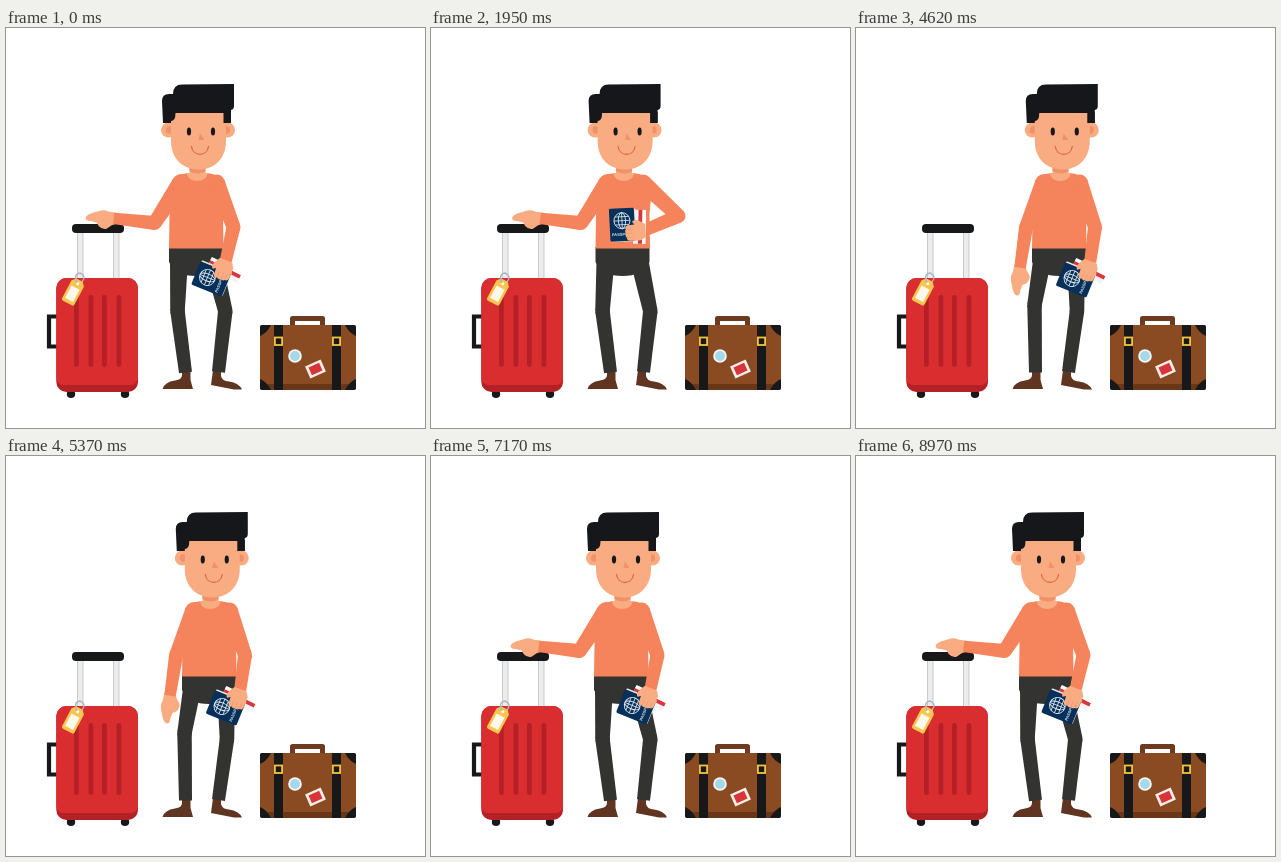
Recreate the animation shown at these times as an HTML page with a canvas. Size 419 by 400 pixels, loop 9000 ms.

```html
<!DOCTYPE html>
<html lang="en">
<head>
<meta charset="utf-8">
<title>Traveller</title>
<style>
html, body { margin: 0; width: 100%; height: 100%; overflow: hidden; background: #fff; }
canvas { display: block; width: 419px; height: 400px; }
</style>
</head>
<body>
<canvas id="stage"></canvas>
<script>
const W = 419, H = 400, LOOP = 9000;
const canvas = document.getElementById('stage');
const ctx = canvas.getContext('2d');
const dpr = window.devicePixelRatio || 1;
canvas.width = W * dpr;
canvas.height = H * dpr;

const SKIN = '#f9ab82', SHADE = '#ef9169', SHIRT = '#f5835b', PANTS = '#333331';
const HAIR = '#15171a', SHOE = '#5f3420', NAVY = '#06305a', BLACK = '#17181a';
const RAD = Math.PI / 180;

// Motion tracks: [time, value]
const BODY = [[0, 0], [500, 0], [1950, 1.5], [3720, 2.2], [4480, 13], [5500, 13], [6520, 12.3], [7120, 0], [9000, 0]];
const RELEASE = [[0, 0], [3740, 0], [4440, 1], [6520, 1], [7120, 0], [9000, 0]];
const RAISE = [[0, 0], [350, 0], [930, 1], [3740, 1], [4440, 0], [9000, 0]];
const SWING = [[0, 0], [350, 0], [1350, 8], [1950, 0], [2800, 11], [3390, 0], [3740, 0], [4620, -1.5],
  [5500, -1.5], [6120, 3], [7170, -1], [8150, 12], [8970, 0], [9000, 0]];

function track(keys, t) {
  let i = 1;
  while (i < keys.length - 1 && t > keys[i][0]) i++;
  const [t0, a] = keys[i - 1], [t1, b] = keys[i];
  const k = Math.min(1, Math.max(0, (t - t0) / (t1 - t0)));
  return a + (b - a) * k * k * (3 - 2 * k);
}
const mix = (a, b, k) => a + (b - a) * k;
const mixPt = (a, b, k) => [mix(a[0], b[0], k), mix(a[1], b[1], k)];
const polar = (p, deg, len) => [p[0] + Math.cos(deg * RAD) * len, p[1] + Math.sin(deg * RAD) * len];

function fill(path, color) {
  ctx.fillStyle = color;
  ctx.fill(path instanceof Path2D ? path : new Path2D(path));
}
function line(path, color, width) {
  ctx.strokeStyle = color;
  ctx.lineWidth = width;
  ctx.stroke(new Path2D(path));
}
function box(x, y, w, h, color, r = 0) {
  const p = new Path2D();
  p.roundRect(x, y, w, h, r);
  fill(p, color);
}
function oval(x, y, rx, ry, color) {
  const p = new Path2D();
  p.ellipse(x, y, rx, ry, 0, 0, 7);
  fill(p, color);
}
function at(x, y, deg, draw) {
  ctx.save();
  ctx.translate(x, y);
  ctx.rotate(deg * RAD);
  draw();
  ctx.restore();
}
// Tapered limb segment, rounded at its start
function limb(a, b, wa, wb, color) {
  const ang = Math.atan2(b[1] - a[1], b[0] - a[0]);
  const nx = -Math.sin(ang) / 2, ny = Math.cos(ang) / 2;
  const p = new Path2D();
  p.moveTo(a[0] + nx * wa, a[1] + ny * wa);
  p.lineTo(b[0] + nx * wb, b[1] + ny * wb);
  p.lineTo(b[0] - nx * wb, b[1] - ny * wb);
  p.lineTo(a[0] - nx * wa, a[1] - ny * wa);
  p.closePath();
  fill(p, color);
  oval(a[0], a[1], wa / 2, wa / 2, color);
}

function redCase() {
  for (const x of [71, 107]) {
    box(x, 203, 6.5, 48, '#c9cacb');
    box(x + 1, 203, 4.5, 48, '#ececec');
  }
  box(66, 196, 52, 9, BLACK, 4);
  line('M51 288.500H43V318.500H51', BLACK, 4.2);
  for (const x of [65, 119]) oval(x, 366, 4.2, 4, BLACK);
  box(50.3, 250, 81.7, 114, '#b32026', 10);
  box(50.3, 250, 81.7, 107, '#d92d30', [10, 10, 7, 7]);
  for (const x of [68, 82.5, 96, 110.5]) box(x, 267, 4.8, 72, '#b52026', 2.4);
  at(67.5, 263.5, 28, () => {
    fill('M-7 -9L-3.500 -13H3.500L7 -9V11Q7 13 5 13H-5Q-7 13 -7 11Z', '#f7c650');
    box(-4.5, -4.5, 9, 14, '#fdf8ec');
    oval(0, -9, 1.6, 1.6, '#fff');
  });
  line('M71 255Q67 246 74 245Q81 248 76 254', '#a9b8c2', 1.4);
}

function brownCase() {
  ctx.lineJoin = 'round';
  line('M286.500 298V290.500H316.500V298', '#6f3b20', 5);
  ctx.lineJoin = 'miter';
  box(254, 297, 96, 65, '#6a3618', 3);
  box(254, 297, 96, 59, '#8b4b22', [3, 3, 0, 0]);
  for (const [x, y, sx, sy] of [[254, 297, 1, 1], [350, 297, -1, 1], [254, 362, 1, -1], [350, 362, -1, -1]]) {
    ctx.save();
    ctx.translate(x, y);
    ctx.scale(sx, sy);
    fill('M0 2Q0 0 2 0H11Q7 8 0 11Z', BLACK);
    ctx.restore();
  }
  for (const x of [268, 326]) {
    box(x, 297, 9, 65, BLACK);
    ctx.strokeStyle = '#f3c33f';
    ctx.lineWidth = 1.8;
    ctx.strokeRect(x + 0.9, 309.5, 7.2, 7.5);
  }
  oval(289, 328, 6.8, 6.8, '#f4f7f7');
  oval(289, 328, 5, 5, '#a5d8e8');
  at(309.5, 341, -24, () => {
    box(-8.5, -6.5, 17, 13, '#f6efe9');
    box(-5.8, -4.2, 11.6, 8.4, '#d8343a');
  });
}

function legs(dx, release) {
  fill('M176 342H184.500V352L187 361H156.500Q158.500 354 169 352.500Q176 351.500 176 347Z', SHOE);
  fill('M207 342H215V348Q216 353 223 353.500Q233 355 236 361.500H228L205 357Z', SHOE);
  const hipL = [173 + dx, 233], hipR = [207 + dx, 233];
  const kneeL = mixPt([171.5, 283], [178.5, 277], release);
  const kneeR = mixPt([219.3, 283], [221, 283], release);
  limb(hipL, kneeL, 18, 14.5, PANTS);
  limb(kneeL, [179.5, 344.5], 14.5, 13, PANTS);
  limb(hipR, kneeR, 18, 14.5, PANTS);
  limb(kneeR, [212.5, 344], 14.5, 13, PANTS);
  at(dx, 0, 0, () => fill('M163 219H217V234Q210 248 190 248Q170 248 163 234Z', PANTS));
}

function torso() {
  fill('M182 145Q171 146 167.500 154Q164 168 163.500 190L163 220.500H217.500L217 185Q220 163 217 154Q213 146 201 145Z', SHIRT);
  fill('M183.500 134H199.500V145H202Q200 153 191 153Q182.500 153 180.500 145H183.500Z', SKIN);
  fill('M183.500 136H199.500V143Q192 148 183.500 143Z', SHADE);
}

function head() {
  for (const x of [162.5, 221.5]) {
    oval(x, 102, 7.5, 7.5, SKIN);
    oval(x + (x < 190 ? 0.8 : -0.8), 102, 3.4, 3.8, SHADE);
  }
  fill('M156 73Q156 66 163 66H167Q167 56.500 176 56.500L228 56V78Q228 81.500 225 82V95H157Z', HAIR);
  fill('M165 93Q169.500 93 169.500 85H220V113C220 131 208 141.500 193 141.500C177 141.500 165 131 165 113Z', SKIN);
  box(217.5, 84, 7.5, 11, HAIR);
  oval(183, 103.5, 2.1, 4, BLACK);
  oval(207, 103.5, 2.1, 4, BLACK);
  fill('M194 105.500L198.500 112H192.500Z', SHADE);
  ctx.lineCap = 'round';
  line('M185.500 118.500C187 129 201 129 202.500 118.500', '#d8643c', 1.2);
  ctx.lineCap = 'butt';
}

function leftArm(dx, release) {
  const shoulder = [175 + dx, 155];
  const elbow = polar(shoulder, mix(123.5, 112, release), 48);
  const wrist = polar(elbow, mix(186.5, 98.5, release), mix(41, 40.5, release));
  at(wrist[0], wrist[1], mix(181, 97, release), () => {
    ctx.scale(1, -1);
    fill('M-2 -6L5 -6.500Q9 -8.500 14 -7.500L23 -4.500Q29 -2 28 1Q27 3.500 23 3L17 4.500L15 8Q12 11.500 7 10.500L2 7L-2 5.500Z', SKIN);
  });
  limb(shoulder, elbow, 18, 14, SHIRT);
  limb(elbow, wrist, 14, 11.5, SHIRT);
}

function passport(raise) {
  at(mix(0, 4, raise), mix(2, -4, raise), 4, () => {
    box(-6, -17, 12, 34, '#f4f3f1');
    box(-1, -17, 4, 34, '#d8383d');
    box(3, -17, 3.5, 34, '#fdfdfd');
  });
  at(-13, -7, 0, () => {
    box(-11.5, -15.5, 25.5, 32.5, '#e8e6df', 1);
    box(-12.5, -16.5, 25, 33, NAVY, 1.5);
    ctx.strokeStyle = '#dfe9ef';
    ctx.lineWidth = 0.9;
    ctx.beginPath();
    ctx.ellipse(0, -4, 8, 8, 0, 0, 7);
    ctx.moveTo(3.6, -4);
    ctx.ellipse(0, -4, 3.6, 8, 0, 0, 7);
    ctx.stroke();
    line('M0 -12V4M-8 -4H8M-6.800 -8H6.800M-6.800 0H6.800', '#dfe9ef', 0.8);
    ctx.fillStyle = '#dfe9ef';
    ctx.font = '700 4px "Liberation Sans", sans-serif';
    ctx.textAlign = 'center';
    ctx.fillText('PASSPORT', 0, 11);
  });
}

function rightArm(dx, raise, swing, release) {
  const shoulder = [210.5 + dx, 155];
  const elbow = mixPt([227.5 + dx, 199], [246 + dx, 188], raise);
  elbow[0] += swing;
  elbow[1] -= Math.max(0, swing) * 0.25;
  const hand = mixPt([216.5 + dx, 241.5], [203 + dx, 203], raise);
  hand[0] += swing * 0.2 + release * 1.8;
  hand[1] += release;
  const turn = mix(-68, -3, raise);
  const wrist = polar(hand, turn - 1, 9);
  limb(shoulder, elbow, 17, 14, SHIRT);
  limb(elbow, wrist, 14, 12, SHIRT);
  at(hand[0], hand[1], turn, () => {
    passport(raise);
    fill('M10 -6.500L4 -10Q-1 -12 -3 -9.500L-1 -6.500L-8 -6Q-11 -5 -9.500 -2Q-11.500 0 -9.500 2Q-11 4.500 -9 6Q-9 9.500 -5 9.500L5 9.500L10 6.500Z', SKIN);
    line('M-9 -2H-3M-9 2H-3M-8 6H-3', SHADE, 0.5);
  });
}

function draw(t) {
  ctx.setTransform(dpr, 0, 0, dpr, 0, 0);
  ctx.fillStyle = '#fff';
  ctx.fillRect(0, 0, W, H);
  const dx = track(BODY, t), release = track(RELEASE, t);
  redCase();
  brownCase();
  legs(dx, release);
  at(dx, 0, 0, torso);
  leftArm(dx, release);
  at(dx * 1.06, 0, 0, head);
  rightArm(dx, track(RAISE, t), track(SWING, t), release);
}

const start = performance.now();
function tick(now) {
  draw(Math.max(0, now - start) % LOOP);
  requestAnimationFrame(tick);
}
draw(0);
requestAnimationFrame(tick);
</script>
</body>
</html>
```
